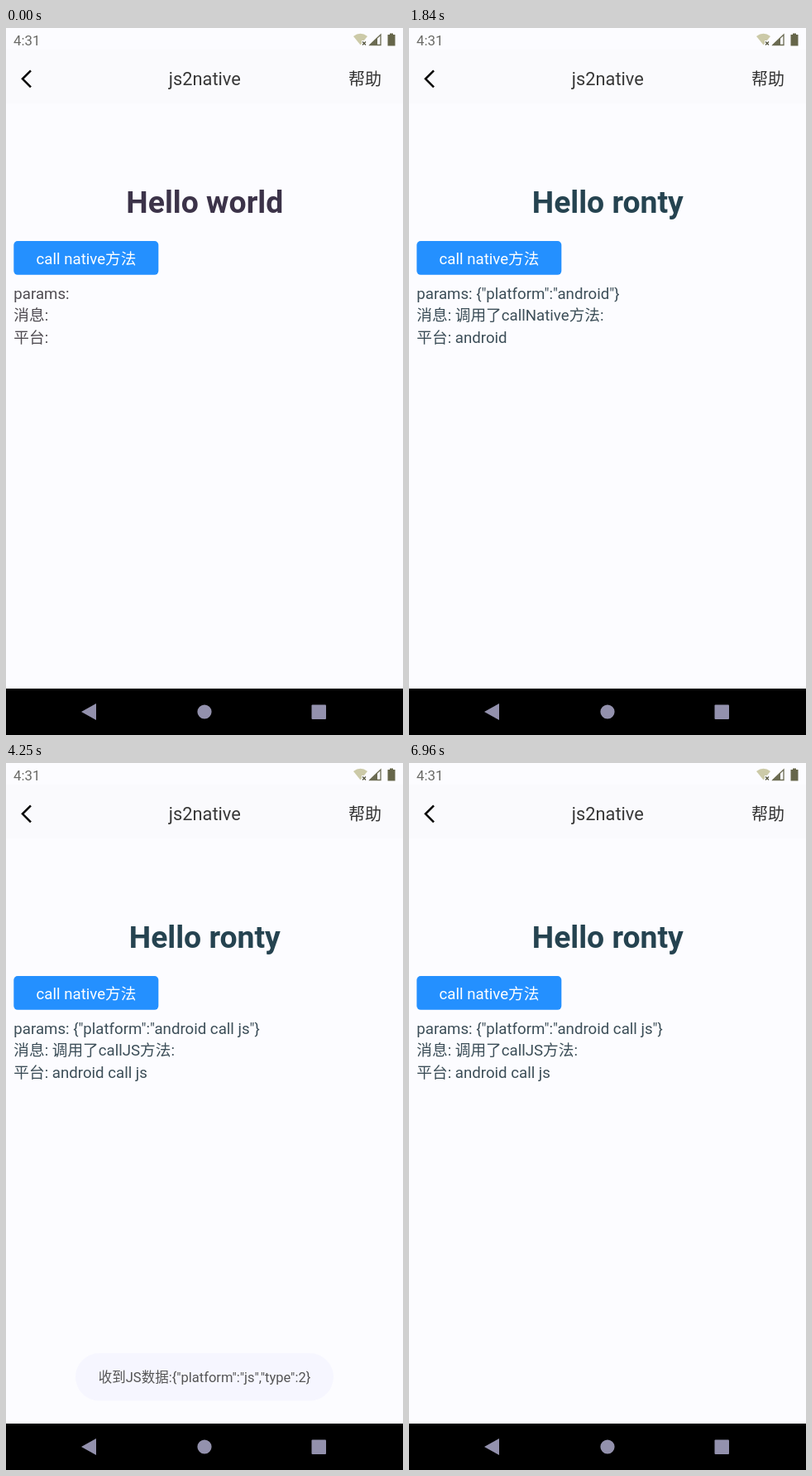
An HTML page for the animation above (7.1 s loop, 480 by 853 pixels).

```html
<!DOCTYPE html>
<html lang="zh-CN">
<head>
<meta charset="utf-8">
<title>js2native</title>
<style>
  html, body { margin: 0; height: 100%; overflow: hidden; background: #fcfcff; }
  svg { display: block; width: 480px; height: 853px; }
  text { font: 18.67px Roboto, "Noto Sans CJK SC", "Noto Sans CJK", sans-serif; white-space: pre; }
  .mid { text-anchor: middle; }
</style>
</head>
<body>
<svg viewBox="0 0 480 853">
  <rect width="480" height="853" fill="#fcfcff"/>
  <rect y="26" width="480" height="65" fill="#fafafd"/>

  <g id="status">
    <text x="9" y="20.5" fill="#6a6a66" style="font-size:16.8px">4:31</text>
    <path d="M420 10Q428.500 3.500 437 10L428.500 20.500Z" fill="#cccaa8"/>
    <path d="M430 15h7v7h-7z" fill="#fcfcff"/>
    <path d="M431 16.500l4 4m0-4l-4 4" stroke="#55553f" stroke-width="1.300"/>
    <path d="M440 20.500L453 8V20.500Z" fill="none" stroke="#6b6b52" stroke-width="1.300"/>
    <path d="M439 21L449 11.500V21Z" fill="#6b6b52"/>
    <path d="M464 6.500h4v1.500h2.500v13.500h-9V8h2.500z" fill="#66664a"/>
  </g>

  <g id="header">
    <path d="M30 51.300L20 61.300L30 71.300" fill="none" stroke="#0c0c0c" stroke-width="2.600"/>
    <text class="mid" x="240.3" y="69.3" fill="#383838" style="font-size:21.8px">js2native</text>
    <text x="414" y="68.500" fill="#333" style="font-size:20px">帮助</text>
  </g>

  <g id="page">
    <text id="heading" class="mid" x="240.3" y="223" style="font-size:37.33px;font-weight:700"></text>
    <rect x="9.330" y="257" width="175" height="40.800" rx="4.700" fill="#2490ff"/>
    <text class="mid" x="97" y="285" fill="#fff">call native方法</text>
    <text id="params" x="9.330" y="327"></text>
    <text id="message" x="9.330" y="353"></text>
    <text id="platform" x="9.330" y="380"></text>
  </g>

  <g id="toast">
    <rect x="84" y="712" width="312" height="57.500" rx="28.700" fill="#f5f5ff"/>
    <text class="mid" x="240" y="747" fill="#2c2c2c" style="font-size:16.5px">收到JS数据:{"platform":"js","type":2}</text>
  </g>

  <rect y="797" width="480" height="56" fill="#000"/>
  <g id="nav" fill="#9391ad">
    <path d="M91 825L109 815V835Z"/>
    <circle cx="240" cy="825" r="8.600"/>
    <rect x="369.500" y="816.500" width="17.500" height="17.500" rx="1"/>
  </g>
</svg>
<script>
const LOOP = 7100, NATIVE_CALL = 1590, JS_CALL = 4000, TOAST_END = 6130, FADE = 450, TINT = 400;
const $ = id => document.getElementById(id);
const clamp = v => Math.min(1, Math.max(0, v));
const mix = (a, b, k) => `rgb(${a.map((v, i) => Math.round(v + (b[i] - v) * k))})`;

const states = [
  { from: 0, name: 'world', params: '', method: '', platform: '' },
  { from: NATIVE_CALL, name: 'ronty', params: '{"platform":"android"}', method: '调用了callNative方法:', platform: 'android' },
  { from: JS_CALL, name: 'ronty', params: '{"platform":"android call js"}', method: '调用了callJS方法:', platform: 'android call js' }
];
let shown;

function showState(state) {
  if (state === shown) return;
  shown = state;
  $('heading').textContent = 'Hello ' + state.name;
  $('params').textContent = 'params: ' + state.params;
  $('message').textContent = '消息: ' + state.method;
  $('platform').textContent = '平台: ' + state.platform;
}

function draw(now) {
  const t = now % LOOP;
  showState(states.findLast(s => t >= s.from));

  const tint = clamp((t - 50) / TINT);
  $('heading').setAttribute('fill', mix([60, 51, 73], [37, 67, 80], tint));
  for (const id of ['params', 'message', 'platform'])
    $(id).setAttribute('fill', mix([80, 76, 82], [60, 78, 88], tint));

  // Toast fades in decelerating and out accelerating
  const enter = 1 - (1 - clamp((t - JS_CALL) / FADE)) ** 2;
  const leave = clamp((t - TOAST_END) / FADE) ** 2;
  $('toast').setAttribute('opacity', enter * (1 - leave));
}

function tick() {
  draw(performance.now());
  requestAnimationFrame(tick);
}
tick();
</script>
</body>
</html>
```
